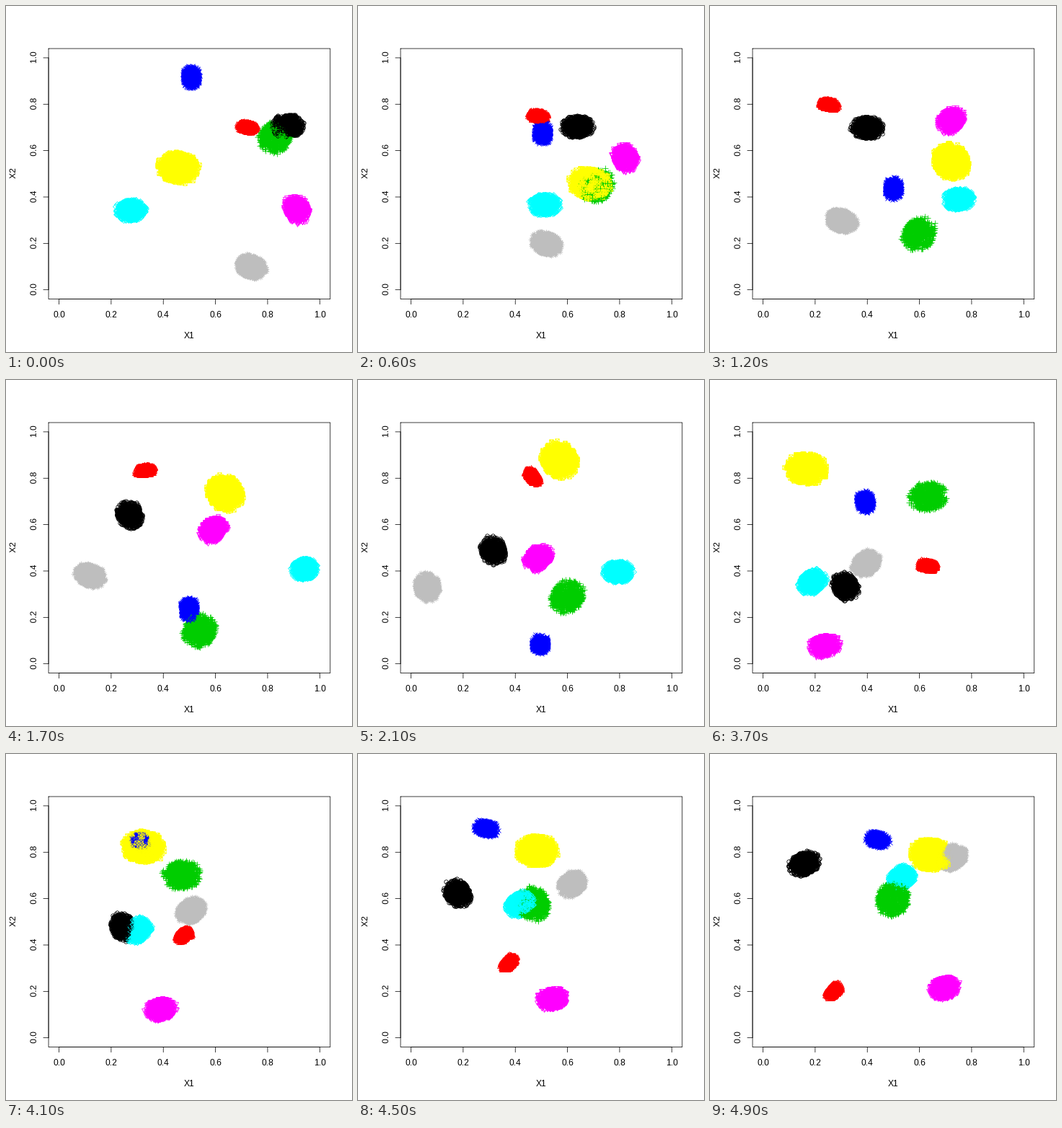
Write a matplotlib script that moves like this. It is 480 px wide and 480 px high and loops after 5 s.

```python
import numpy as np
import matplotlib.pyplot as plt
from matplotlib.animation import FuncAnimation
from matplotlib.patches import PathPatch
from matplotlib.path import Path
from matplotlib.textpath import TextPath

SIZE, FRAMES, INTERVAL = 480, 50, 100
SPEED = 0.0399              # every cluster drifts this far per frame
CHUNKS, PER_CHUNK = 20, 42  # points are laid down in time order, clusters interleaved
LINE = 14.4                 # height of one margin line
LEFT, TOP, RIGHT, BOTTOM = 4.1 * LINE, 4.1 * LINE, SIZE - 2.1 * LINE, SIZE - 5.1 * LINE

plt.rcParams["font.family"] = "Liberation Sans"


def to_px(x, y):
    """Data units (range -0.04..1.04) to stage pixels."""
    px = LEFT + (np.asarray(x) + 0.04) / 1.08 * (RIGHT - LEFT)
    py = BOTTOM - (np.asarray(y) + 0.04) / 1.08 * (BOTTOM - TOP)
    return px, py


def strokes(*lines):
    """Marker path made of separate polylines."""
    verts = [p for line in lines for p in line]
    codes = [c for line in lines for c in [Path.MOVETO] + [Path.LINETO] * (len(line) - 1)]
    return Path(verts, codes)


CROSS = ([(-1, -1), (1, 1)], [(-1, 1), (1, -1)])
BOXED = strokes([(-1, -1), (1, -1), (1, 1), (-1, 1), (-1, -1)], *CROSS)
STAR = strokes([(-1.414, 0), (1.414, 0)], [(0, -1.414), (0, 1.414)], *CROSS)
SMALL, MEDIUM, LARGE = 5.4, 6.8, 7.6


class Cluster:
    """A disc of points that moves between turning points at constant speed."""

    def __init__(self, color, marker, size, radius, *turns):
        self.color, self.marker, self.size, self.radius = color, marker, size, radius
        self.x, self.y = np.array(turns).T
        steps = np.hypot(np.diff(self.x), np.diff(self.y))
        self.times = np.concatenate([[0], np.cumsum(steps)]) / SPEED

    def sample(self, t, rng):
        angle = rng.uniform(0, 2 * np.pi, t.size)
        reach = self.radius * np.sqrt(rng.random(t.size))
        return (np.interp(t, self.times, self.x) + reach * np.cos(angle),
                np.interp(t, self.times, self.y) + reach * np.sin(angle))


clusters = [
    Cluster("black", "o", SMALL, 0.047,
            (.897, .709), (.255, .697), (.42, .112), (.125, .732), (.176, .763)),
    Cluster("red", "^", MEDIUM, 0.0235,
            (.741, .699), (.193, .813), (.434, .854), (.76, .399), (.483, .455), (.257, .189)),
    Cluster("#00cd00", "+", LARGE, 0.060,
            (.838, .678), (.522, .104), (.783, .739), (.437, .7), (.484, .51), (.499, .616)),
    Cluster("blue", "x", SMALL, 0.0325,
            (.507, .936), (.495, .074), (.378, .778), (.243, .918), (.463, .847)),
    Cluster("cyan", "D", SMALL, 0.0435,
            (.253, .342), (.95, .411), (.175, .342), (.545, .706)),
    Cluster("magenta", "v", MEDIUM, 0.046,
            (.918, .327), (.743, .756), (.138, .048), (.71, .219)),
    Cluster("yellow", BOXED, SMALL, 0.066,
            (.437, .535), (.78, .429), (.544, .93), (.066, .853), (.664, .788)),
    Cluster("#bebebe", STAR, LARGE, 0.046,
            (.753, .092), (.048, .414), (.098, .125), (.742, .796)),
]

fig = plt.figure(figsize=(SIZE / 72, SIZE / 72), dpi=72, facecolor="white")
ax = fig.add_axes([0, 0, 1, 1])
ax.set(xlim=(0, SIZE), ylim=(SIZE, 0))
ax.axis("off")


def rule(xs, ys):
    """Thin black line at its exact sub-pixel place."""
    ax.plot(xs, ys, color="black", lw=0.75, snap=False,
            solid_capstyle="round", solid_joinstyle="round", zorder=3)


def label(x, baseline, text):
    ax.text(x, baseline, text, fontsize=12, ha="center", va="baseline")


def upright_label(baseline, y, text):
    """Text that reads upwards, drawn as outlines for exact placement."""
    glyphs = TextPath((0, 0), text, size=12)
    along, up = glyphs.vertices.T
    middle = (along.min() + along.max()) / 2
    turned = np.column_stack([baseline - up, y + middle - along])
    ax.add_patch(PathPatch(Path(turned, glyphs.codes), fc="black", lw=0))


def draw_axes():
    rule([LEFT, RIGHT, RIGHT, LEFT, LEFT], [TOP, TOP, BOTTOM, BOTTOM, TOP])
    xs, ys = to_px([0, 1], [0, 1])
    rule(xs, [BOTTOM, BOTTOM])
    rule([LEFT, LEFT], ys)
    for value in np.linspace(0, 1, 6):
        x, y = to_px(value, value)
        rule([x, x], [BOTTOM, BOTTOM + LINE / 2])
        rule([LEFT - LINE / 2, LEFT], [y, y])
        label(x, BOTTOM + 1.8 * LINE, f"{value:.1f}")
        upright_label(LEFT - 1.2 * LINE, y, f"{value:.1f}")
    label((LEFT + RIGHT) / 2, BOTTOM + 3.8 * LINE, "X1")
    upright_label(LEFT - 3.2 * LINE, (TOP + BOTTOM) / 2, "X2")


draw_axes()
layers = [
    [ax.plot([], [], ls="none", marker=c.marker, ms=c.size, mfc="none",
             mec=c.color, mew=0.8, snap=False, zorder=2)[0] for c in clusters]
    for _ in range(CHUNKS)
]


def update(frame):
    rng = np.random.default_rng(frame + 1)
    for chunk, layer in enumerate(layers):
        for dots, cluster in zip(layer, clusters):
            t = frame + (chunk + rng.random(PER_CHUNK)) / CHUNKS
            dots.set_data(*to_px(*cluster.sample(t, rng)))
    return [dots for layer in layers for dots in layer]


anim = FuncAnimation(fig, update, frames=FRAMES, interval=INTERVAL,
                     repeat=True, repeat_delay=0, blit=False)
plt.show()
```
